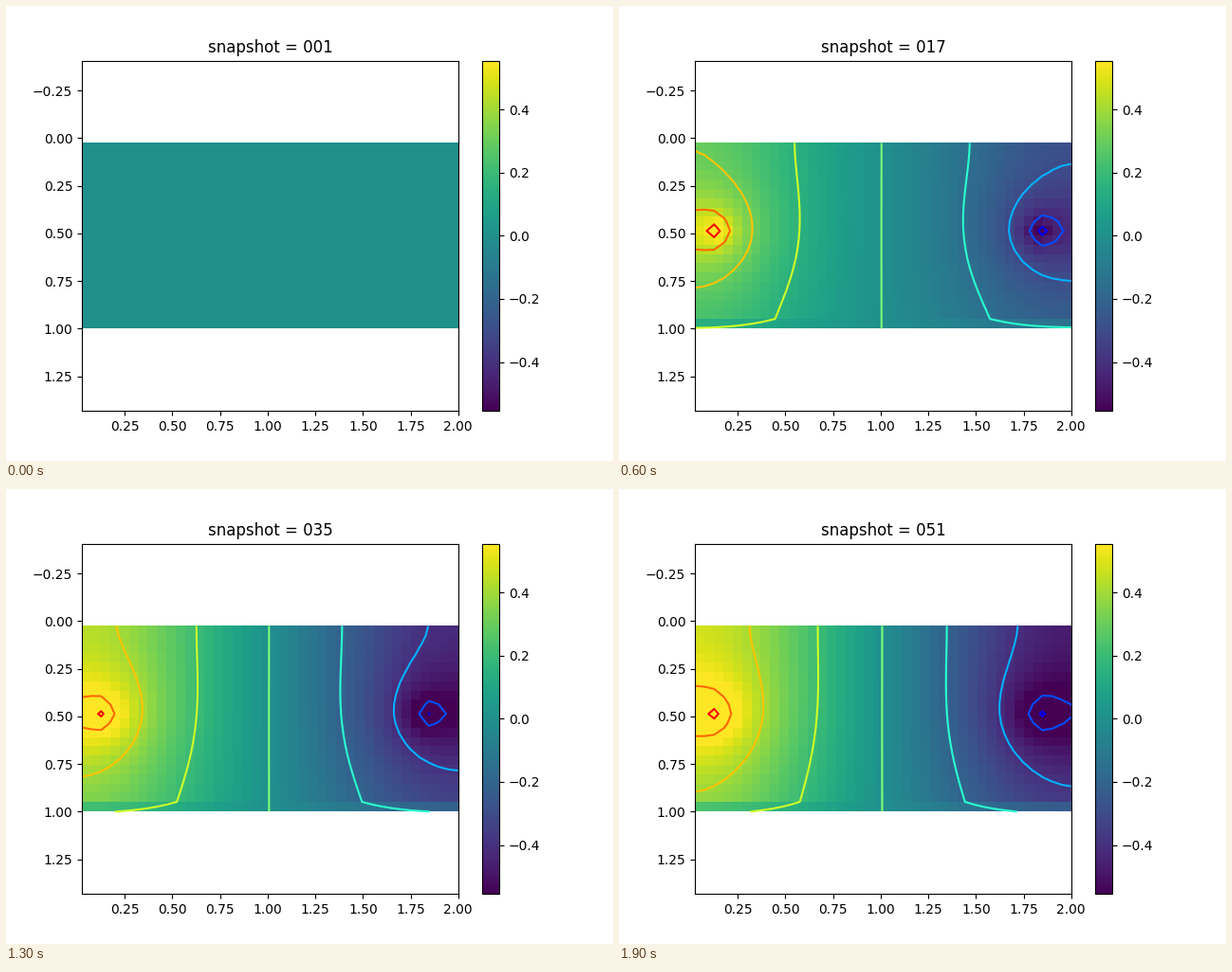
A matplotlib script that plays this animation: 640x480 px, repeating every 2 s.

```python
import numpy as np
import matplotlib.pyplot as plt
from matplotlib.animation import FuncAnimation

NX, NY = 40, 20
FRAMES = 20
DIFFUSION = 7.6          # cells^2 per snapshot
RATE = 0.74              # well strength relative to the diffusion
SEAL, LEAK = 0.10, 0.05  # conductance into and out of the bottom row
VMAX = 0.5553

x = np.linspace(0.025, 2.0, NX)
y = np.linspace(0.025, 1.0, NY)
snapshots = np.rint(np.linspace(1, 51, FRAMES)).astype(int)


def chain(links):
    """Conductance matrix of cells joined in a row."""
    return (np.diag(np.r_[links, 0] + np.r_[0, links])
            - np.diag(links, 1) - np.diag(links, -1))


# The field separates into modes along x and modes along y.
links_y = np.ones(NY - 1)
links_y[-1] = SEAL
rows = chain(links_y)
rows[-1, -1] += LEAK
ly, vy = np.linalg.eigh(rows)
lx, vx = np.linalg.eigh(chain(np.ones(NX - 1)))

wells = np.zeros((NY, NX))
wells[9, 2] = RATE
wells[9, 36] = -RATE
modes = vy.T @ wells @ vx
decay = ly[:, None] + lx[None, :]


def pressure(snapshot):
    t = DIFFUSION * (snapshot - 1)
    return vy @ (modes * -np.expm1(-decay * t) / decay) @ vx.T


fig, ax = plt.subplots(figsize=(6.4, 4.8), dpi=100)
image = ax.imshow(np.zeros((NY, NX)), extent=(x[0], x[-1], y[-1], y[0]),
                  cmap="viridis", vmin=-VMAX, vmax=VMAX,
                  interpolation="nearest", aspect="auto")
fig.colorbar(image, ax=ax)
title = ax.set_title("")
half = (x[-1] - x[0]) * 369.6 / 396.8 / 2
mid = (y[0] + y[-1]) / 2


def update(frame):
    for lines in list(ax.collections):
        lines.remove()
    snapshot = snapshots[frame]
    field = pressure(snapshot)
    image.set_data(field)
    title.set_text(f"snapshot = {snapshot:03d}")
    if snapshot > 1:
        ax.contour(x, y, field, 10, cmap="jet")
    ax.set_xlim(x[0], x[-1])
    ax.set_ylim(mid + half, mid - half)
    return []


anim = FuncAnimation(fig, update, frames=FRAMES, interval=100,
                     init_func=lambda: update(0), repeat=True, repeat_delay=0)
plt.show()
```
